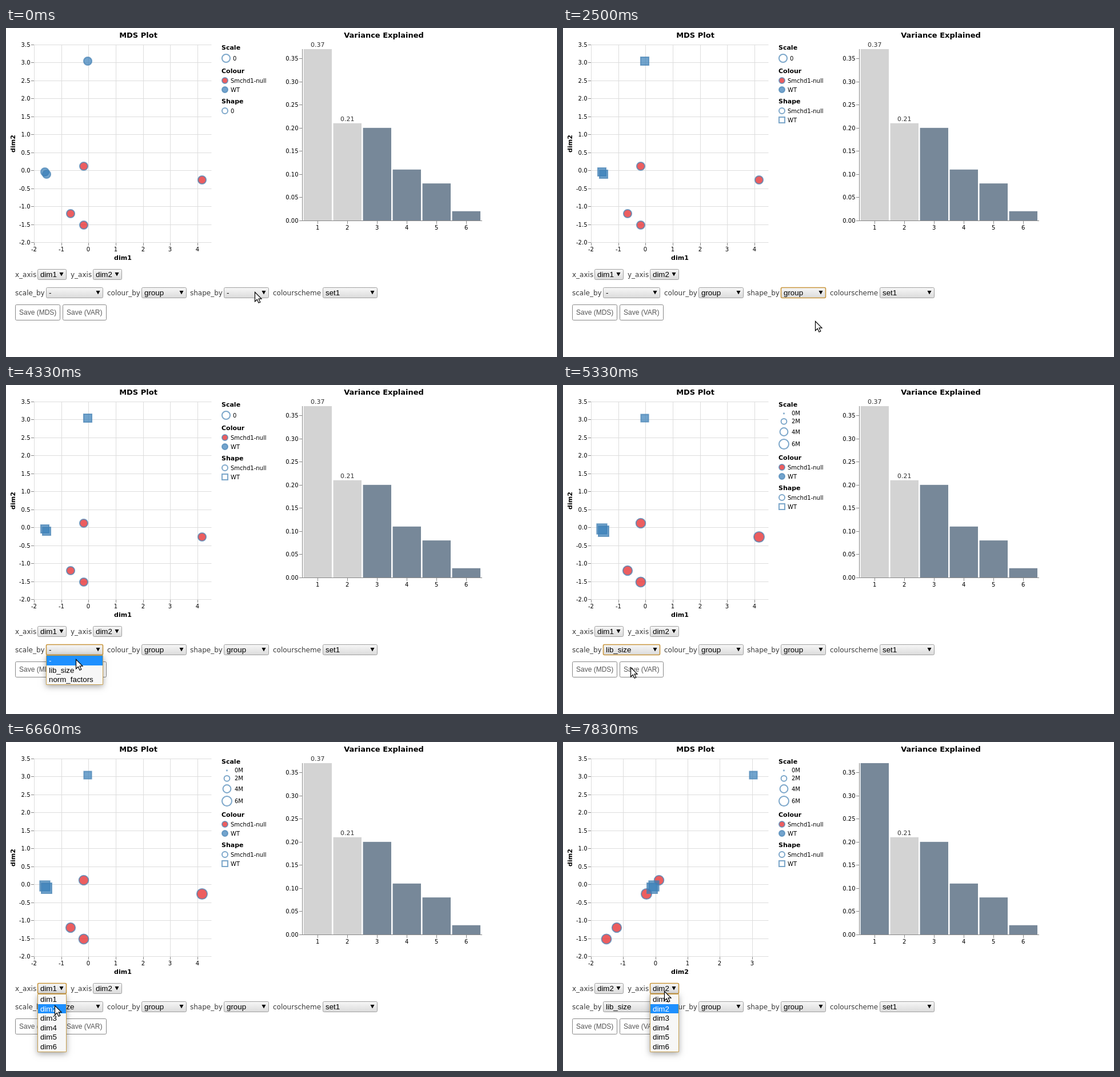
These frames come from a looping animation (964x576 px, 8000 ms). An HTML page with a canvas:

```html
<!DOCTYPE html>
<html lang="en">
<head>
<meta charset="utf-8">
<title>MDS Plot</title>
<style>
html, body { margin: 0; width: 100%; height: 100%; overflow: hidden; background: #fff; }
canvas { display: block; }
</style>
</head>
<body>
<canvas id="stage" width="964" height="576"></canvas>
<script>
const ctx = document.getElementById('stage').getContext('2d');
const LOOP = 8000;
const SANS = '"DejaVu Sans", sans-serif';
const ARIAL = '"Liberation Sans", Arial, sans-serif';
const SMALL = '10px ' + SANS, HEAD = 'bold 11px ' + SANS, TITLE = 'bold 13px ' + SANS;
const CONTROL = '13.333px ' + ARIAL;
const RED = '#e41a1c', BLUE = '#377eb8', STEEL = '#4682b4';
const ITEM = 16.6;
const DIMS = [1, 2, 3, 4, 5, 6].map(n => 'dim' + n);

// x on dim1, x on dim2, y, half size when scaled by lib_size
const reds = [[136, 168, 242, 8.3], [343, 146, 266, 9.1], [113, 94, 325, 8.2], [136, 76, 345, 8.5]];
const blues = [[143, 333, 58, 6.6], [68, 159, 252, 8.7], [71, 156, 256, 9]];
const variance = [0.37, 0.21, 0.2, 0.11, 0.08, 0.02];

// time, x, y of the pointer; each position is held until the next
const pointer = [
  [0, 435, 462], [1330, 438, 470], [1500, 441, 484], [1660, 443, 497], [1830, 442, 508], [2000, 441, 513],
  [2660, 425, 512], [2830, 365, 504], [3000, 270, 490], [3160, 175, 474], [3330, 125, 467],
  [4160, 124, 473], [4330, 122, 480], [4500, 120, 488], [4660, 118, 494],
  [5660, 115, 485], [5830, 104, 464], [6000, 91, 444], [6160, 84, 433],
  [6500, 84, 447], [6660, 85, 461], [7330, 100, 455], [7500, 140, 442], [7660, 177, 436]
];

// menus: control, opening and closing time
const menus = [['shape', 660, 2500], ['scale', 3660, 5330], ['x', 6330, 7160], ['y', 7830, LOOP]];

const controls = {
  x: { label: 'x_axis', lx: 16, x: 55, y: 422, w: 51, items: DIMS },
  y: { label: 'y_axis', lx: 113, x: 152, y: 422, w: 51, items: DIMS },
  scale: { label: 'scale_by', lx: 16, x: 70, y: 454, w: 100, items: ['-', 'lib_size', 'norm_factors'] },
  colour: { label: 'colour_by', lx: 177, x: 237, y: 454, w: 79 },
  shape: { label: 'shape_by', lx: 322, x: 381, y: 454, w: 79, border: '#b0b0b0',
    items: ['-', 'genotype', 'group', 'labels', 'sampleID'] },
  scheme: { label: 'colourscheme', lx: 467, x: 554, y: 454, w: 96 }
};

function text(s, x, y, font, color = '#000', align = 'left') {
  ctx.font = font;
  ctx.fillStyle = color;
  ctx.textAlign = align;
  ctx.fillText(s, x, y);
}

function line(x1, y1, x2, y2, color) {
  ctx.strokeStyle = color;
  ctx.lineWidth = 1;
  ctx.beginPath();
  ctx.moveTo(x1, y1);
  ctx.lineTo(x2, y2);
  ctx.stroke();
}

function box(x, y, w, h, radius, fill, stroke, width = 1) {
  ctx.beginPath();
  ctx.roundRect(x + 0.5, y + 0.5, w - 1, h - 1, radius);
  ctx.fillStyle = fill;
  ctx.fill();
  ctx.strokeStyle = stroke;
  ctx.lineWidth = width;
  ctx.stroke();
}

function symbol(x, y, half, fill, square) {
  ctx.globalAlpha = 0.7;
  ctx.beginPath();
  if (square) ctx.rect(x - half, y - half, 2 * half, 2 * half);
  else ctx.arc(x, y, half, 0, 2 * Math.PI);
  if (fill) {
    ctx.fillStyle = fill;
    ctx.fill();
  }
  ctx.strokeStyle = STEEL;
  ctx.lineWidth = 2;
  ctx.stroke();
  ctx.globalAlpha = 1;
}

function scatter(state) {
  const max = state.swapped ? 3.5 : 4.5;
  text('MDS Plot', 231.5, 17, TITLE, '#000', 'center');
  for (let v = -2; v <= max; v++) {
    const x = 49.5 + Math.round((v + 2) * 310 / (max + 2) - 0.01);
    line(x, 29, x, 375, '#ddd');
    line(x, 376, x, 381, '#888');
    text(v, x - 0.5, 391, SMALL, '#000', 'center');
  }
  for (let v = -2; v <= 3.5; v += 0.5) {
    const y = 29.5 + Math.round((3.5 - v) * 346 / 5.5);
    line(49, y, 359.5, y, '#ddd');
    line(44, y, 49, y, '#888');
    text(v.toFixed(1), 42.5, y + 3.5, SMALL, '#000', 'right');
  }
  text(state.swapped ? 'dim2' : 'dim1', 204.5, 406, HEAD, '#000', 'center');
  ctx.save();
  ctx.translate(16, 202.5);
  ctx.rotate(-Math.PI / 2);
  text('dim2', 0, 0, HEAD, '#000', 'center');
  ctx.restore();
  const plot = (points, fill, square) => points.forEach(([x1, x2, y, half]) =>
    symbol(state.swapped ? x2 : x1, y, state.scaled ? half : 7.07, fill, square));
  plot(reds, RED, false);
  plot(blues, BLUE, state.shaped);
}

function legend(state) {
  const dy = state.scaled ? 52 : 0;
  const entry = (s, y, fill, square) => {
    symbol(383, y, 5, fill, square);
    text(s, 393, y + 3.5, SMALL);
  };
  text('Scale', 377, 38, HEAD);
  if (state.scaled) {
    [49.8, 63.8, 82, 103.5].forEach((y, i) => {
      symbol(386.5, y, Math.max(0.6, 8.5 * Math.sqrt(i / 3)));
      text(2 * i + 'M', 400, y + 3.5, SMALL);
    });
  } else {
    symbol(385, 53, 7.07);
    text('0', 397, 56.5, SMALL);
  }
  text('Colour', 377, 79 + dy, HEAD);
  entry('Smchd1-null', 92 + dy, RED);
  entry('WT', 108 + dy, BLUE);
  text('Shape', 377, 132 + dy, HEAD);
  entry(state.shaped ? 'Smchd1-null' : '0', 145 + dy);
  if (state.shaped) entry('WT', 161 + dy, null, true);
}

function barChart(state) {
  const unit = 300 / 0.37;
  text('Variance Explained', 661, 17, TITLE, '#000', 'center');
  variance.forEach((v, i) => {
    const x = 520.6 + 52 * i, top = 337 - v * unit;
    const active = i === 1 || (i === 0 && !state.swapped);
    ctx.fillStyle = active ? '#d3d3d3' : '#778899';
    ctx.fillRect(x, top, 49.4, v * unit);
    if (active) text(v.toFixed(2), x + 24.7, top - 4, '11px ' + SANS, '#333', 'center');
    line(545.5 + 52 * i, 338, 545.5 + 52 * i, 343, '#888');
    text(i + 1, x + 24.7, 353, SMALL, '#000', 'center');
  });
  for (let i = 0; i < 8; i++) {
    const y = 337.5 - Math.round(i * 0.05 * unit);
    line(513, y, 518, y, '#888');
    text((i * 0.05).toFixed(2), 511.5, y + 3.5, SMALL, '#000', 'right');
  }
  line(518.5, 37, 518.5, 338, '#888');
  line(518, 337.5, 833, 337.5, '#888');
}

function select(c, value, focused) {
  const shade = ctx.createLinearGradient(0, c.y, 0, c.y + 19);
  shade.addColorStop(0, '#f8f8f8');
  shade.addColorStop(1, '#dadada');
  text(c.label, c.lx, c.y + 14, '12px ' + SANS, '#3a3a3a');
  box(c.x, c.y, c.w, 19, 2, shade, focused ? '#c8963e' : '#a0a0a0', focused ? 1.6 : 1);
  text(value, c.x + 5, c.y + 14, CONTROL);
  const x = c.x + c.w - 9, y = c.y + 6;
  ctx.beginPath();
  ctx.moveTo(x - 3.5, y);
  ctx.lineTo(x + 3.5, y);
  ctx.lineTo(x, y + 6.5);
  ctx.fill();
}

function popup(c, value, pointerY) {
  const top = c.y + 20;
  const hovered = pointerY < top ? c.items.indexOf(value) : Math.floor((pointerY - top) / ITEM);
  ctx.save();
  ctx.shadowColor = 'rgba(0,0,0,.35)';
  ctx.shadowBlur = 10;
  ctx.shadowOffsetY = 3;
  ctx.fillStyle = '#f7f7f7';
  ctx.fillRect(c.x, top - 1, c.w, Math.round(c.items.length * ITEM) + 2);
  ctx.restore();
  box(c.x, top - 1, c.w, Math.round(c.items.length * ITEM) + 2, 0, '#f7f7f7', c.border || '#c8a050');
  c.items.forEach((item, i) => {
    const y = Math.round(top + i * ITEM);
    if (i === hovered) {
      ctx.fillStyle = '#1e90ff';
      ctx.fillRect(c.x + 1, y, c.w - 2, Math.round(top + (i + 1) * ITEM) - y);
    }
    text(item, c.x + 5, y + 12.5, CONTROL, i === hovered ? '#fff' : '#000');
  });
}

function button(s, x, w) {
  box(x, 484, w, 28, 2, '#fff', '#888');
  text(s, x + 7, 502, '12px ' + ARIAL, '#555');
}

const arrow = new Path2D('M.5 .5V16.8L4.3 13.3L7 19.3L9.8 18L7.1 12.2H12Z');

function drawPointer(x, y) {
  ctx.save();
  ctx.translate(x, y);
  ctx.fillStyle = '#fff';
  ctx.fill(arrow);
  ctx.strokeStyle = '#000';
  ctx.lineWidth = 1.2;
  ctx.stroke(arrow);
  ctx.restore();
}

function draw(t) {
  const state = { shaped: t >= 2500, scaled: t >= 5330, swapped: t >= 7160 };
  const values = {
    x: state.swapped ? 'dim2' : 'dim1', y: 'dim2', scale: state.scaled ? 'lib_size' : '-',
    colour: 'group', shape: state.shaped ? 'group' : '-', scheme: 'set1'
  };
  const [, px, py] = pointer.findLast(p => p[0] <= t);
  const [focus, , closes] = menus.findLast(m => m[1] <= t) || [];

  ctx.fillStyle = '#fff';
  ctx.fillRect(0, 0, 964, 576);
  scatter(state);
  legend(state);
  barChart(state);
  for (const key in controls) select(controls[key], values[key], key === focus);
  button('Save (MDS)', 16, 79);
  button('Save (VAR)', 99, 77);
  if (focus && t < closes) popup(controls[focus], values[focus], py);
  drawPointer(px, py);
}

function tick() {
  draw(performance.now() % LOOP);
  requestAnimationFrame(tick);
}
tick();
</script>
</body>
</html>
```
